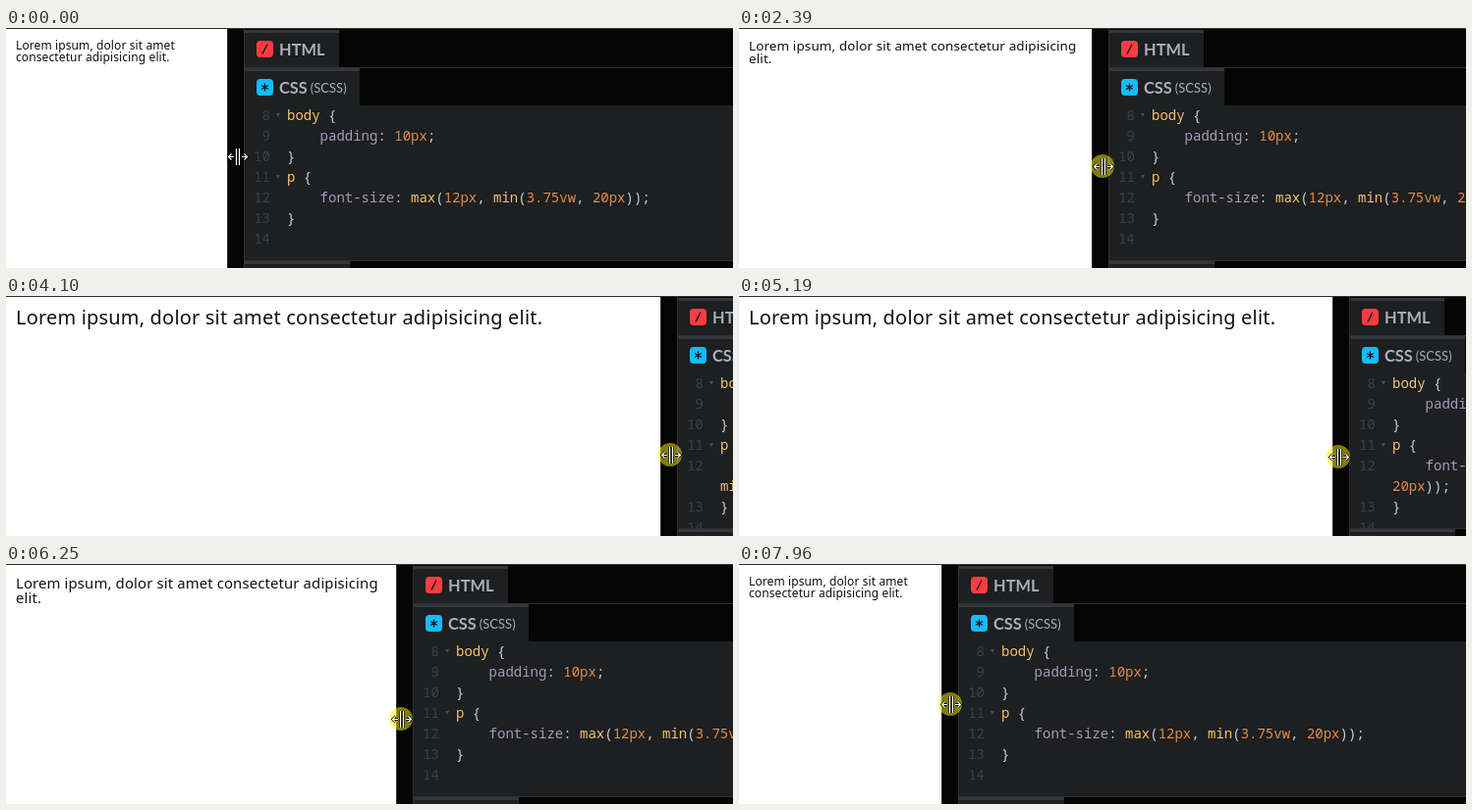
Animation of 740 by 245 pixels, one loop 8 s. Source, as an HTML page:

```html
<!DOCTYPE html>
<html lang="en">
<head>
<meta charset="utf-8">
<title>Fluid type demo</title>
<style>
/* Whole-number properties keep every edge on the pixel grid */
@property --w { syntax: "<integer>"; inherits: true; initial-value: 225; }
@property --x { syntax: "<integer>"; inherits: true; initial-value: 235; }
@property --y { syntax: "<integer>"; inherits: true; initial-value: 131; }

html, body { margin: 0; width: 100%; height: 100%; overflow: hidden; background: #050505; }
.stage {
  --line: #2e2f31;
  position: relative; width: 740px; height: 245px; overflow: hidden;
  animation: drag 8s infinite;
}
.stage::before {
  content: ""; position: absolute; inset: 0 0 auto; height: 1px;
  background: var(--line); z-index: 2;
}

/* --w: preview width, --x and --y: pointer */
@keyframes drag {
  0%       { --w: 225; --x: 235; --y: 131; animation-timing-function: step-end; }
  8.5%     { --w: 222; --x: 231; --y: 131; animation-timing-function: steps(8); }
  15.5%    { --w: 184; --x: 194; --y: 131; animation-timing-function: step-end; }
  17.875%  { --w: 193; --x: 203; --y: 131; animation-timing-function: steps(15); }
  29.875%  { --w: 359; --x: 370; --y: 141; animation-timing-function: steps(14); }
  40.875%  { --w: 523; --x: 532; --y: 151; animation-timing-function: steps(9); }
  48.25%   { --w: 642; --x: 652; --y: 159; animation-timing-function: steps(3); }
  50.5%    { --w: 666; --x: 676; --y: 162; animation-timing-function: steps(3); }
  52.875%  { --w: 682; --x: 692; --y: 164; animation-timing-function: step-end; }
  57.5%    { --w: 678; --x: 686; --y: 164; animation-timing-function: steps(3); }
  59.875%  { --w: 659; --x: 665; --y: 164; animation-timing-function: steps(6); }
  64.875%  { --w: 604; --x: 610; --y: 164; animation-timing-function: steps(3); }
  67.125%  { --w: 571; --x: 577; --y: 163; animation-timing-function: steps(14); }
  78.125%  { --w: 397; --x: 402; --y: 158; animation-timing-function: steps(12); }
  87.75%   { --w: 251; --x: 258; --y: 148; animation-timing-function: steps(3); }
  90%      { --w: 220; --x: 228; --y: 145; animation-timing-function: steps(3); }
  92.375%  { --w: 203; --x: 212; --y: 143; animation-timing-function: step-end; }
  99.5%    { --w: 206; --x: 215; --y: 143; animation-timing-function: step-end; }
  100%     { --w: 206; --x: 215; --y: 143; }
}

.preview {
  position: absolute; left: 0; top: 1px; bottom: 0;
  width: calc(var(--w) * 1px); box-sizing: border-box; padding: 11px 10px;
  background: #fff; box-shadow: 1px 0 var(--line);
}
.preview p {
  margin: 0; color: #111;
  font: clamp(12px, calc(var(--w) * .0375px), 20px)/1 "Noto Sans", sans-serif;
  letter-spacing: .009em;
}

/* The panel runs on past the right edge of the stage */
.panel {
  position: absolute; top: 0; bottom: 0;
  left: calc(var(--w) * 1px + 17px); width: calc(999px - var(--w) * 1px);
  background: #050505;
}
.panel::after {
  content: ""; position: absolute; left: 0; top: 1px; bottom: 0; width: 1px;
  background: var(--line);
}
.bar { position: absolute; left: 0; right: 0; height: 39px; border-top: 1px solid var(--line); }
.bar:first-child { border-color: transparent; }
.tab {
  box-sizing: border-box; height: 38px; padding: 0 0 2px 13px;
  display: flex; align-items: center;
  background: #1d1f20; border-top: 3px solid #343639;
  color: #aaaebc; font: bold 16.4px Lato, sans-serif;
}
.tab svg { margin-right: 6px; flex: none; }
.tab small { margin-left: 3px; font-size: 13px; font-weight: 400; }

.editor {
  position: absolute; left: 0; right: 0; top: 79px; height: 158px;
  overflow: hidden; background: #1d1f20;
}
.code {
  margin: -1px 10px 0 44px; counter-reset: line 7;
  font: 14px/21px "Noto Sans Mono", monospace; color: #cdd0d8;
}
.code div { position: relative; min-height: 21px; white-space: pre-wrap; counter-increment: line; }
.code div::before {
  content: counter(line); position: absolute; left: -44px; top: 0;
  width: 27px; text-align: right; color: #3d4145;
}
.code .fold::after {
  content: ""; position: absolute; left: -11px; top: 9px;
  border: solid transparent; border-width: 4px 2.5px 0; border-top-color: #4a4e52;
}
.code b { font-weight: 500; color: #f9c36c; }
.code i { font-style: normal; color: #a898bd; }
.code u { text-decoration: none; color: #e38b4c; }

.pointer {
  position: absolute; left: -13px; top: -13px; z-index: 3;
  transform: translate(calc(var(--x) * 1px), calc(var(--y) * 1px));
}
.glow { fill: #fff000; animation: press 8s step-end infinite; }
@keyframes press {
  0%     { opacity: 0; }
  3.875% { opacity: .17; }
  4.625% { opacity: .34; }
  5.375%, 100% { opacity: .51; }
}
</style>
</head>
<body>
<div class="stage">
  <div class="preview"><p>Lorem ipsum, dolor sit amet consectetur adipisicing elit.</p></div>

  <div class="panel">
    <div class="bar" style="top:1px">
      <div class="tab" style="width:97px">
        <svg width="17" height="17">
          <rect width="17" height="17" rx="4" fill="#ff3c41"/>
          <path d="M6 13.5L11 3.5" stroke="#1d1012" stroke-width="1.4"/>
        </svg>HTML
      </div>
    </div>

    <div class="bar" style="top:40px">
      <div class="tab" style="width:118px">
        <svg width="17" height="17">
          <rect width="17" height="17" rx="4" fill="#0ebeff"/>
          <path d="M8.5 4.5v8M5 6.5l7 4M12 6.5l-7 4" stroke="#0b1a20" stroke-width="1.4"/>
        </svg>CSS<small>(SCSS)</small>
      </div>
    </div>

    <div class="editor"><div class="code"
      ><div class="fold"><b>body</b> {</div
      ><div>    <i>padding</i>: <u>10px</u>;</div
      ><div>}</div
      ><div class="fold"><b>p</b> {</div
      ><div>    <i>font-size</i>: <b>max</b>(<u>12px</u>, <b>min</b>(<u>3.75vw</u>, <u>20px</u>));</div
      ><div>}</div
      ><div></div
    ></div></div>

    <div class="bar" style="top:237px"><div class="tab" style="width:108px"></div></div>
  </div>

  <svg class="pointer" width="26" height="26" viewBox="-13 -13 26 26" fill="none">
    <defs>
      <path id="resize" d="M-.5 -8V9M2.5 -8V9M-3 .5H-8.5M-5.5 -2.5L-8.5 .5L-5.5 3.5M5 .5H10.5M7.5 -2.5L10.5 .5L7.5 3.5"/>
    </defs>
    <circle class="glow" r="12"/>
    <use href="#resize" stroke="#000" stroke-width="2.6"/>
    <use href="#resize" stroke="#fff" stroke-width="1.2"/>
  </svg>
</div>
</body>
</html>
```
